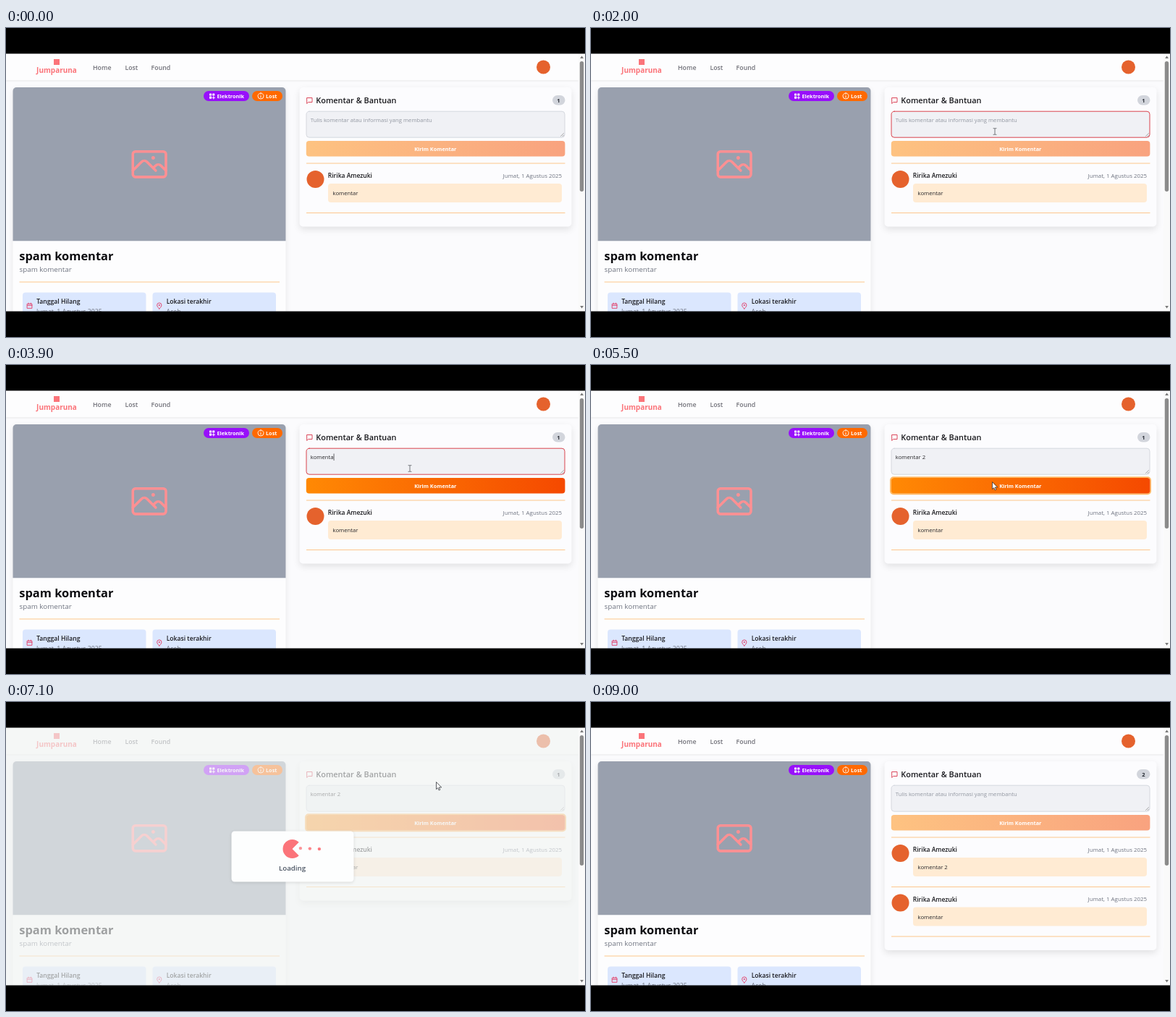
An HTML page with a canvas that plays this animation: 800x427 px, repeating every 9100 ms.

```html
<!DOCTYPE html>
<html lang="id">
<head>
<meta charset="utf-8">
<title>Komentar</title>
<style>
html, body { margin: 0; width: 100%; height: 100%; overflow: hidden; background: #000; }
canvas { display: block; width: 800px; height: 427px; }
</style>
</head>
<body>
<canvas id="stage" width="800" height="427"></canvas>
<script>
const ctx = document.getElementById('stage').getContext('2d');
const LOOP = 9100;
const FONT = '"Open Sans", "Noto Sans", sans-serif';
const USER = 'Ririka Amezuki';
const DATE = 'Jumat, 1 Agustus 2025';
const DRAFT = 'komentar 2';
const KEY_TIMES = [2500, 2700, 2950, 3200, 3400, 3600, 3800, 4000, 4200, 4400];
const FOCUS = 1300, CLICK = 5350, LOADING = 5510, DONE = 7500;
const TOP = 35.5, HEIGHT = 356;
const CORAL = '#fb747a', LINE = '#fdc78c', GRAY = '#6f7480', INK = '#0c0c10';

// time, x, y of the pointer
const POINTER = [
  [200, 600, 391], [900, 558, 143], [4900, 558, 143], [5250, 554.5, 162],
  [5900, 554.5, 162], [6700, 594.5, 111], [8000, 594.5, 111]
];

const smooth = p => p * p * (3 - 2 * p);
const clamp = v => Math.max(0, Math.min(1, v));

function box(x, y, w, h, r, fill, stroke, lineWidth = 1) {
  ctx.beginPath();
  ctx.roundRect(x, y, w, h, r);
  if (fill) { ctx.fillStyle = fill; ctx.fill(); }
  if (stroke) { ctx.strokeStyle = stroke; ctx.lineWidth = lineWidth; ctx.stroke(); }
}

function disc(x, y, r, fill) {
  ctx.beginPath();
  ctx.arc(x, y, r, 0, Math.PI * 2);
  ctx.fillStyle = fill;
  ctx.fill();
}

function text(str, x, y, size, color, weight = 400, align = 'left') {
  ctx.font = `${weight} ${size}px ${FONT}`;
  ctx.textAlign = align;
  ctx.fillStyle = color;
  ctx.fillText(str, x, y);
}

function path(d, stroke, lineWidth, fill) {
  const shape = new Path2D(d);
  if (fill) { ctx.fillStyle = fill; ctx.fill(shape); }
  if (stroke) {
    ctx.strokeStyle = stroke;
    ctx.lineWidth = lineWidth;
    ctx.lineCap = ctx.lineJoin = 'round';
    ctx.stroke(shape);
  }
}

function shadowed(blur, dy, color, draw) {
  ctx.save();
  ctx.shadowBlur = blur;
  ctx.shadowOffsetY = dy;
  ctx.shadowColor = color;
  draw();
  ctx.restore();
}

function rule(x, y, w) {
  ctx.fillStyle = LINE;
  ctx.fillRect(x, y, w, 1);
}

function header() {
  shadowed(2, 0.6, 'rgba(0,0,0,.12)', () => box(0, 35, 791, 37.5, 0, '#fdfdfe'));
  box(66, 43, 8, 8, 0, CORAL);
  text('Jumparuna', 70, 62, 10, CORAL, 700, 'center');
  text('Home', 120, 57.6, 8.8, '#717179', 600);
  text('Lost', 164.4, 57.6, 8.8, '#717179', 600);
  text('Found', 200.6, 57.6, 8.8, '#717179', 600);
  disc(742.5, 54, 9.5, '#e5622d');
}

function infoBox(x, title, value) {
  box(x, 365.5, 170.5, 40, 4, '#dbe7fe');
  text(title, x + 19.2, 381, 8.6, '#18181c', 600);
  text(value, x + 19, 394.5, 8.8, GRAY);
}

function pictureIcon(cx, cy) {
  ctx.save();
  ctx.translate(cx, cy);
  ctx.scale(2.344, 2.344);
  ctx.translate(-12, -12);
  box(2.25, 4.5, 19.5, 15, 1.5, null, '#ff9093', 1.5);
  path('M2.25 15.75 l5.16 -5.16 a2.25 2.25 0 0 1 3.18 0 l5.16 5.16 m-1.5 -1.5 l1.41 -1.41 a2.25 2.25 0 0 1 3.18 0 l2.91 2.91', '#ff9093', 1.5);
  disc(14.25, 8.25, 1.05, '#ff9093');
  ctx.restore();
}

function itemCard() {
  shadowed(8, 3, 'rgba(0,0,0,.09)', () => box(9.5, 82, 377, 330, 5, '#fdfdfe'));
  box(9.5, 82, 377, 212.3, [5, 5, 0, 0], '#99a0ae');
  pictureIcon(198.1, 188.3);

  box(273, 87, 63, 14, 7, '#9810fa');
  for (const [x, y] of [[281, 90.5], [285.2, 90.5], [281, 94.6]]) box(x, y, 3.1, 3.1, 0.6, '#fff');
  path('M286.8 94.6 v3.4 M285.1 96.3 h3.4', '#fff', 1);
  text('Elektronik', 291.5, 96.8, 7.3, '#fff', 700);

  box(340, 87, 42, 14, 7, '#ff6900');
  box(348, 90, 8, 8, 4, null, '#fff', 0.9);
  path('M352 92.1 v.1 M352 94 v2', '#fff', 1);
  text('Lost', 359, 96.8, 7.3, '#fff', 700);

  text('spam komentar', 18.3, 321, 16.45, INK, 700);
  text('spam komentar', 18.5, 337.3, 9.8, GRAY);
  rule(18.5, 350.5, 359.5);
  infoBox(23, 'Tanggal Hilang', DATE);
  infoBox(202.5, 'Lokasi terakhir', 'Aceh');
  path('M29.5 381.3 h6.4 v6 h-6.4 z M29.5 383.4 h6.4 M31.1 380 v1.6 M34.3 380 v1.6', '#e23a66', 0.9);
  path('M211.8 388 C209.5 385.5 208.7 384.3 208.7 383 A3.1 3.1 0 0 1 214.9 383 C214.9 384.3 214.1 385.5 211.8 388 Z', '#e23a66', 0.9);
  disc(211.8, 383, 1, '#e23a66');
}

function comment(y, message) {
  disc(427.5, y + 22, 12, '#e5622d');
  text(USER, 444.8, y + 20, 8.5, '#18181c', 600);
  text(DATE, 768, y + 19.5, 7.9, GRAY, 400, 'right');
  box(445, y + 28, 323, 26, 4, '#ffebd3');
  text(message, 451.5, y + 44, 7.7, '#27272a');
  rule(415, y + 68, 357.5);
}

function textarea(t, typed) {
  const focused = t >= FOCUS && t < CLICK;
  box(415, 115.2, 357, 36, 4, '#f0f1f5', focused ? '#d6303a' : '#d2d5dc', 0.9);
  path('M766.5 149.5 l4 -4 M769 149.7 l1.6 -1.6', '#777', 0.6);
  if (typed) text(typed, 420.8, 130, 7.7, '#27272a');
  else text('Tulis komentar atau informasi yang membantu', 420.8, 130, 7.7, '#9297a1');

  const lastKey = KEY_TIMES.filter(k => k <= t).pop() ?? FOCUS;
  if (focused && (t - lastKey) % 1060 < 530) {
    ctx.font = `400 7.7px ${FONT}`;
    ctx.fillStyle = '#27272a';
    ctx.fillRect(421 + ctx.measureText(typed).width, 122.5, 0.7, 9.5);
  }
}

function buttonStrength(t) {
  if (t >= DONE) return 0.5;
  if (t >= LOADING) return 0.82;
  return 0.5 + 0.5 * clamp((t - KEY_TIMES[0]) / 200);
}

function sendButton(t) {
  if (t >= CLICK && t < DONE) box(413, 154.2, 361, 25, 5, '#ffb860');
  box(414.8, 156, 357.6, 21.4, 4, '#fcfcfe');
  const fill = ctx.createLinearGradient(415, 0, 772, 0);
  fill.addColorStop(0, '#ff8904');
  fill.addColorStop(1, '#f54900');
  ctx.save();
  ctx.globalAlpha = buttonStrength(t);
  box(414.8, 156, 357.6, 21.4, 4, fill);
  ctx.restore();
  text('Kirim Komentar', 593.3, 169.5, 7.3, '#fff', 700, 'center');
}

function commentCard(t) {
  const sent = t >= DONE;
  const typed = sent ? '' : DRAFT.slice(0, KEY_TIMES.filter(k => k <= t).length);
  shadowed(10, 4, 'rgba(0,0,0,.1)', () => box(405.5, 82, 376, sent ? 261 : 192.5, 5, '#fcfcfe'));
  path('M416 96.5 h7 v6 h-5.3 l-1.7 1.7 z', '#d8344a', 0.9);
  text('Komentar & Bantuan', 428.3, 104.4, 10.9, '#18181c', 600);
  box(sent ? 754 : 755, 93, sent ? 18.5 : 17.5, 13.6, 6.8, '#d2d5dc');
  text(sent ? '2' : '1', 763.5, 102.6, 7.5, '#23272f', 700, 'center');
  textarea(t, typed);
  sendButton(t);
  rule(415, 186.5, 357.5);
  if (sent) comment(187, DRAFT);
  comment(sent ? 255.5 : 187, 'komentar');
}

function scrollbar() {
  box(791, TOP, 9, HEIGHT, 0, '#fafafa');
  box(792.8, 46, 5.4, 180, 2.7, '#8b8b8b');
  path('M793.2 42 l2.4 -3.4 l2.4 3.4 z', null, 0, '#777');
  path('M793.2 384 l2.4 3.4 l2.4 -3.4 z', null, 0, '#777');
}

function loader(t) {
  const age = (t - LOADING) / 1000;
  box(0, 35, 791, 357, 0, 'rgba(241,244,243,.64)');
  shadowed(4, 1, 'rgba(0,0,0,.12)', () => box(311.5, 178.5, 169, 70, 4.5, '#fdfefe'));

  for (let i = 2; i < 6; i++) {
    const run = age - i * 0.25;
    const p = run > 0 ? run % 1 : 0;
    ctx.globalAlpha = p < 0.75 ? 1 - 0.4 * p : 0.7 + 1.2 * (p - 0.75);
    disc(437.6 - 52 * p, 203.3 - 2 * p, 2.2, CORAL);
  }
  ctx.globalAlpha = 1;

  const bite = (age / 0.8) % 1;
  const closed = smooth(1 - Math.abs(1 - 2 * bite));
  const mouth = (45 - 44 * closed) * Math.PI / 180;
  ctx.beginPath();
  ctx.moveTo(395.5, 203);
  ctx.arc(395.5, 203, 13, mouth, -mouth);
  ctx.fillStyle = CORAL;
  ctx.fill();
  text('Loading', 395.5, 232.8, 9.7, '#4b5563', 600, 'center');
}

function pointer(t) {
  const next = POINTER.findIndex(k => k[0] > t);
  if (next < 1) return;
  const [t0, x0, y0] = POINTER[next - 1];
  const [t1, x1, y1] = POINTER[next];
  const p = smooth((t - t0) / (t1 - t0));
  const x = x0 + (x1 - x0) * p;
  const y = y0 + (y1 - y0) * p;
  ctx.save();
  ctx.translate(x, y);
  if (y > 115 && y < 152 && t < LOADING) {
    path('M-2 -4.3 h1.4 l.6 .5 l.6 -.5 h1.4 M0 -3.8 v7.6 M-2 4.3 h1.4 l.6 -.5 l.6 .5 h1.4', '#55585e', 0.8);
  } else {
    path('M0 0 V9.6 L2.2 7.6 L3.7 11 L5.3 10.3 L3.8 7 H6.8 Z', '#33363c', 0.8, '#fff');
  }
  ctx.restore();
}

function render(now) {
  const t = now % LOOP;
  ctx.fillStyle = '#000';
  ctx.fillRect(0, 0, 800, 427);
  ctx.save();
  box(0, 35, 800, 357, 0, '#fbfbfd');
  ctx.beginPath();
  ctx.rect(0, 35, 800, 357);
  ctx.clip();
  itemCard();
  commentCard(t);
  header();
  if (t >= LOADING && t < DONE) loader(t);
  scrollbar();
  pointer(t);
  ctx.restore();

  // letterbox bars meet the page halfway through a pixel row
  box(0, 0, 800, TOP, 0, '#000');
  box(0, TOP + HEIGHT, 800, 427 - TOP - HEIGHT, 0, '#000');
}

const start = performance.now();
function tick() {
  render(performance.now() - start);
  requestAnimationFrame(tick);
}
tick();
</script>
</body>
</html>
```
